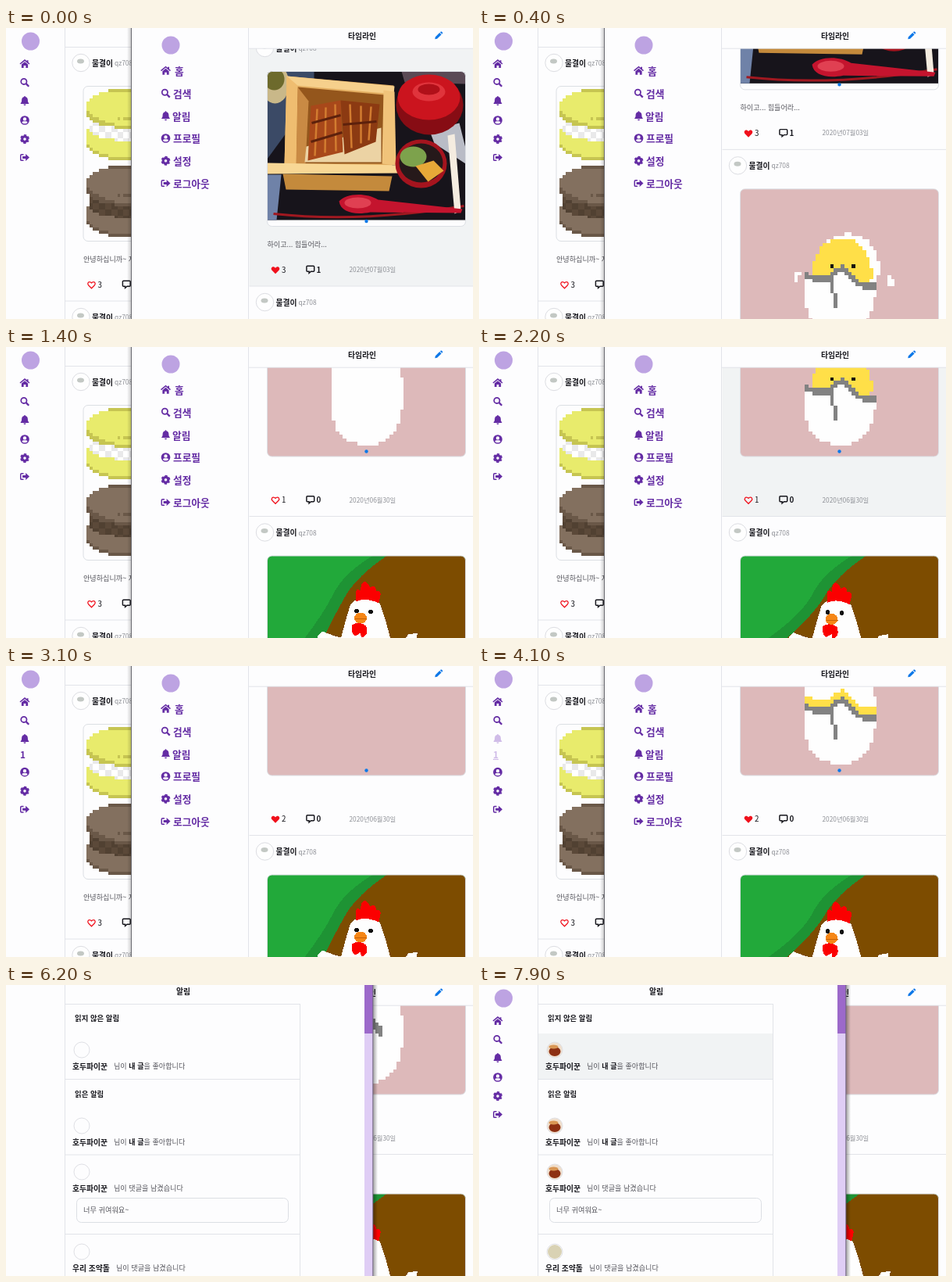
Write an HTML page that moves like this. It is 598 by 372 pixels and loops after 8 s.

```html
<!DOCTYPE html>
<html lang="ko">
<head>
<meta charset="utf-8">
<title>타임라인</title>
<style>
html, body { margin: 0; width: 100%; height: 100%; overflow: hidden; background: #fdfdfe; }
svg { display: block; width: 598px; height: 372px; }
text { font-family: "Noto Sans CJK KR", "Noto Sans CJK JP", "Noto Sans", sans-serif; white-space: pre; }
</style>
</head>
<body>
<svg id="stage" viewBox="0 0 598 372" xmlns="http://www.w3.org/2000/svg"></svg>
<script>
const NS = 'http://www.w3.org/2000/svg';
const LOOP = 8000;
const BG = '#fdfdfe', HOVER = '#f1f3f4', LINE = '#e2e4e9', INK = '#16161c', SOFT = '#55555c';
const GREY = '#8e9096', PURPLE = '#642ca4', PALE = '#d0bce8', BLUE = '#0d78e8', RED = '#f0101c';
const NAME = '물결이', HANDLE = 'qz708', FAN = '호두파이꾼', FAN2 = '우리 조약돌';

const stage = document.getElementById('stage');

function add(parent, tag, attrs = {}) {
  const node = document.createElementNS(NS, tag);
  for (const key in attrs) node.setAttribute(key, attrs[key]);
  parent.appendChild(node);
  return node;
}
const group = (parent, attrs) => add(parent, 'g', attrs);
const rect = (p, x, y, width, height, fill, more) => add(p, 'rect', { x, y, width, height, fill, ...more });
const path = (p, d, fill, more) => add(p, 'path', { d, fill, ...more });
const circle = (p, cx, cy, r, fill, more) => add(p, 'circle', { cx, cy, r, fill, ...more });
const oval = (p, cx, cy, rx, ry, fill) => add(p, 'ellipse', { cx, cy, rx, ry, fill });
const line = (p, d, stroke = LINE, width = 1) => path(p, d, 'none', { stroke, 'stroke-width': width });
const show = (node, on) => node.setAttribute('display', on ? 'inline' : 'none');
const shift = (node, x, y) => node.setAttribute('transform', `translate(${x} ${y})`);

// y is the optical middle of the line
function label(p, x, y, str, size, fill = INK, weight = 400, anchor = 'start') {
  const node = add(p, 'text', { x, y: y + size * 0.37, fill, 'font-size': size, 'font-weight': weight, 'text-anchor': anchor });
  node.textContent = str;
  return node;
}

// Pixel art: pick(col, row) gives a colour or nothing
function pixels(p, cols, rows, size, pick) {
  const runs = {};
  for (let r = 0; r < rows; r++) for (let c = 0; c < cols; c++) {
    const color = pick(c, r);
    if (color) runs[color] = (runs[color] || '') + `M${(c * size).toFixed(2)} ${(r * size).toFixed(2)}h${size}v${size}h${-size}z`;
  }
  const g = group(p, { 'shape-rendering': 'crispEdges' });
  for (const color in runs) path(g, runs[color], color);
  return g;
}

// ---- icons, drawn around 0,0 in a 16 unit box
const ICONS = {
  home: '<path d="M-8 0L0-6.600 8 0" fill="none" stroke="currentColor" stroke-width="2.1"/><path d="M3.500-6.500h2.500v4h-2.500zM-5.500.8L0-3.800 5.500.8V6.800H1.800V2.800H-1.800V6.800H-5.500z"/>',
  search: '<circle cx="-1.500" cy="-1.500" r="4.800" fill="none" stroke="currentColor" stroke-width="2.400"/><path d="M2.200 2.200L7 7" stroke="currentColor" stroke-width="3"/>',
  bell: '<path d="M0-8a1 1 0 0 1 1 1.300C4-6 5.200-3.700 5.200-1 5.200 2 6 3 7 4V5.200H-7V4C-6 3-5.200 2-5.200-1-5.200-3.700-4-6-1-6.700A1 1 0 0 1 0-8zM-2 6H2a2 2 0 0 1-4 0z"/>',
  user: '<path fill-rule="evenodd" d="M0-7.800a7.800 7.800 0 1 1 0 15.600a7.800 7.800 0 1 1 0-15.600zM0-5a2.900 2.900 0 1 0 0 5.800a2.900 2.900 0 1 0 0-5.800zM-4.700 3.800C-3 6.500 3 6.500 4.700 3.800C4 2 2.600 1.600 0 1.800C-2.600 1.600-4 2-4.700 3.800z"/>',
  cog: '<circle r="4.400" fill="none" stroke="currentColor" stroke-width="4.200"/><circle r="6.800" fill="none" stroke="currentColor" stroke-width="2.200" stroke-dasharray="4.200 2.920" stroke-dashoffset="2.100" transform="rotate(30)"/>',
  exit: '<path d="M-2-5H-5.500Q-7-5-7-3.500V3.500Q-7 5-5.500 5H-2" fill="none" stroke="currentColor" stroke-width="2"/><path d="M-3.800-2H1.500V-6L8 0 1.500 6V2H-3.800z"/>',
  pencil: '<path d="M-7 7L-6.200 2.800 1.800-5.200 5.200-1.800-2.800 6.200zM2.800-6.200L4-7.300Q5-8 6-7L7-6Q8-5 7.300-4L6.200-2.800z"/>',
  heart: '<path d="M0 6.500L-6 .4C-9-3-5.600-7.600-1.600-5.200L0-3.800 1.600-5.200C5.600-7.600 9-3 6 .4z"/>',
  comment: '<path d="M-5.500-6H5.500Q7-6 7-4.500V2.500Q7 4 5.500 4H1L-2.500 7V4H-5.500Q-7 4-7 2.500V-4.500Q-7-6-5.500-6z" fill="none" stroke="currentColor" stroke-width="2.100"/>'
};
function icon(p, name, x, y, color, size = 0.75) {
  const g = group(p, { transform: `translate(${x} ${y})`, color, fill: 'currentColor' });
  group(g, { transform: `scale(${size})` }).innerHTML = ICONS[name];
  return g;
}
function heart(p, x, y, full) {
  const g = icon(p, 'heart', x, y, RED, full ? 0.74 : 0.66);
  if (!full) {
    const shape = g.firstChild.firstChild;
    shape.setAttribute('fill', 'none');
    shape.setAttribute('stroke', RED);
    shape.setAttribute('stroke-width', 1.9);
  }
  return g;
}

// ---- one post: 325 high, card 254 x 198 at 23,50
function post(p, x, y, { likes, full, talks, date, text, dots = 1, own, draw }) {
  const g = group(p, { transform: `translate(${x} ${y})` });
  const back = rect(g, 0, 0, 301, 325, HOVER);
  show(back, false);
  circle(g, 20, 20.5, 11.2, '#fefefe', { stroke: '#dcdde2' });
  oval(g, 19.5, 18.5, 4.5, 3, '#c3c8c4');
  label(g, 34, 21, NAME, 9.8, INK, 700);
  label(g, 63, 21, HANDLE, 8.4, GREY);
  const card = group(g, { transform: 'translate(23 50.500)', 'clip-path': 'url(#card)' });
  rect(card, 0, 0, 254, 198, BG);
  const parts = draw(card);
  rect(g, 23, 50.5, 254, 198, 'none', { rx: 6, stroke: '#dcdfe4' });
  for (let i = 0; i < dots; i++) circle(g, 150 + (i - (dots - 1) / 2) * 8.6, 242, 2.2, i ? '#c9cbd0' : BLUE);
  if (text) label(g, 23, 271.3, text, 9.1, SOFT);
  const hollow = heart(g, 33.5, 304.5, false), solid = heart(g, 33.5, 304.5, true);
  const count = label(g, 41.5, 304.3, likes, 9.8, INK, 500);
  icon(g, 'comment', 78.3, 303.5, INK, 0.7);
  label(g, 86, 304.3, talks, 9.8, INK, 700);
  label(g, 128, 304, date, 8.3, GREY);
  if (own) line(g, 'M244.500 303.700L249.200 308.400L253.900 303.700', INK, 2.8);
  line(g, 'M0 325H301');
  const like = (on, n) => { show(hollow, !on); show(solid, on); count.textContent = n; };
  like(!!full, likes);
  return { back, like, parts };
}

// ---- pictures
function macaron(p, x, y, [light, dark, creamA, creamB]) {
  const art = pixels(p, 30, 23, 3.95, (c, r) => {
    const u = Math.abs(c - 14.5) / 15;
    const top = 4.2 * u ** 4, seam = 12.3 - 3.7 * u ** 3, base = 22.4 - 4.5 * u ** 4;
    if (r + 0.3 < top || r >= base) return;
    if (r < seam) {
      const mark = r === 0 || (r === 9 && c > 9 && c < 18 && c !== 11);
      return r >= seam - 1 - 1.5 * u ** 3 || mark ? dark : light;
    }
    if (r < seam + 4) return u > 0.93 ? null : ((c >> 1) + (r >> 1)) % 2 ? creamA : creamB;
    return r >= base - 1 ? dark : light;
  });
  shift(art, x, y);
}
function macarons(p) {
  macaron(p, 4, 3.5, ['#e8eb6c', '#c6c552', '#ffffff', '#e9e9ea']);
  macaron(p, 131, 3.5, ['#9ae0cb', '#82c2b0', '#ffffff', '#e9e9ea']);
  macaron(p, 4, 101.8, ['#83705f', '#6a5848', '#5b4939', '#514132']);
  macaron(p, 131, 101.8, ['#ff8fb0', '#ec7395', '#e8668a', '#d95c80']);
}

function lunch(p) {
  rect(p, 0, 0, 254, 190, '#17141b');
  path(p, 'M0 0H60V30L0 112z', '#3b4a66');
  path(p, 'M0 132L18 132 12 190H0z', '#6f82a8');
  path(p, 'M172 0H254V16L176 14z', '#5a4a55');
  path(p, 'M208 76L246 66 254 98V118L214 92z', '#b9bcc6');
  path(p, 'M8 182Q120 194 252 172', 'none', { stroke: '#a01820', 'stroke-width': 3 });
  oval(p, 10, 16, 18, 25, '#c9b889');
  oval(p, 9, 10, 13, 14, '#6d6a2c');
  path(p, 'M25 6L162 18 160 122 22 122z', '#e2ad60');
  path(p, 'M39 20L150 30 148 118 37 118z', '#94561c');
  path(p, 'M39 20L53 38 49 118 37 118z', '#c98a44');
  path(p, 'M50 96L146 72V116H48z', '#ecd3a4');
  path(p, 'M56 44L94 37 97 103 52 114z', '#a8481a');
  path(p, 'M94 37L144 42 139 90 99 106z', '#8c3a12');
  line(p, 'M64 48L61 108M75 46L74 104M87 42L88 102M106 42L108 98M120 44L120 92M133 45L130 88', '#d27c30', 2.5);
  line(p, 'M57 66L94 56M56 90L96 78M97 68L140 64', '#5d210c', 3);
  path(p, 'M25 6L163 19 162 29 25 17z', '#f6d08c');
  path(p, 'M25 6L39 18 37 118 22 118z', '#efbd70');
  path(p, 'M149 24L163 26 165 120 147 118z', '#f0c37a');
  path(p, 'M20 131L160 134 156 153 24 151z', '#c48a3c');
  path(p, 'M0 117L178 120 179 130 0 131z', '#f8d795');
  oval(p, 208, 43, 43, 38, '#870c14');
  oval(p, 207, 33, 40, 29, '#cb141e');
  oval(p, 207, 26, 21, 12, '#e0343c');
  oval(p, 207, 23, 14, 7, '#b01019');
  oval(p, 197, 118, 33, 31, '#a5141e');
  oval(p, 197, 117, 28, 25, '#26191a');
  oval(p, 187, 109, 17, 13, '#7da24c');
  path(p, 'M190 121L213 114 226 127 206 141z', '#e8a838');
  path(p, 'M231 82L240 80 248 178 240 182z', '#f4ece0');
  path(p, 'M92 166C100 156 126 154 142 164L250 176 248 181 132 180C112 184 94 180 92 166z', '#c4142e');
  oval(p, 116, 168, 17, 7, '#e04052');
}

const RIM = [[81, 107], [96, 116], [112, 114], [131, 101], [144, 114], [152, 122], [174, 124]];
function rimAt(x) {
  const i = Math.max(1, RIM.findIndex(pt => pt[0] >= x));
  const [[ax, ay], [bx, by]] = [RIM[i - 1], RIM[i]];
  return ay + (by - ay) * (x - ax) / (bx - ax);
}
const inside = (x, y, cx, cy, rx, ry, n = 2) => Math.abs((x - cx) / rx) ** n + Math.abs((y - cy) / ry) ** n < 1;

function eggs(p) {
  rect(p, 0, 0, 254, 198, '#ddb9ba');
  const S = 4.6, HALF = S / 2, white = '#fefefe', grey = '#828282', yellow = '#ffdf48';
  const make = mode => pixels(p, 55, 43, S, (c, r) => {
    const x = (c + 0.5) * S, y = (r + 0.5) * S;
    const egg = inside(x, y, 127, 118, 46.5, 65, 2.5);
    if (mode === 'whole') return egg && white;
    const rim = x > 81 && x < 174 ? rimAt(x) : 110;
    const split = Math.abs(y - rim) < 4;
    const tail = y > 116 && y < 154 && Math.abs(x - (y < 135 ? 116 : 124)) <= HALF;
    if (mode === 'crack') return egg && (Math.abs(y - rim - 4) < 7 && x > 131 && x < 149 ? grey : white);
    if (egg && (split || tail)) return grey;
    if (egg && y > rim) return white;
    if (mode === 'open') return egg && (y > rim - 14 ? yellow : white);
    if (Math.abs(y - 99) <= HALF && Math.abs(Math.abs(x - 130) - 15) <= HALF) return '#15130f';
    if (y < rim && inside(x, y, 130, 108, 38.5, 45)) return yellow;
    if (mode !== 'pop') return;
    if (y < rim && inside(x, y, 138, 100, 40, 43)) return white;
    const shard = (x > 68 && x < 78 && y > 106 && y < 112) || (x > 68 && x < 73 && y < 118 && y > 106) ||
      (x > 187 && x < 198 && y > 113 && y < 122) || (x > 188 && x < 193 && y > 109 && y < 114);
    return shard && white;
  });
  const out = {};
  for (const mode of ['whole', 'crack', 'open', 'chick', 'pop']) out[mode] = make(mode);
  return out;
}

function hen(p) {
  const hill = [[161, 60], [153, 72]].map(([a, b]) => {
    const g = group(p, { 'shape-rendering': 'crispEdges' });
    rect(g, 0, 0, 254, 198, '#22a93a');
    path(g, `M${a - 18} 0Q${a - 55} 22 ${a - 68} 48T${b - 24} 105L0 198H254V0z`, '#1e9334');
    path(g, `M${a} 0Q${a - 38} 26 ${a - 52} 50T${b} 105L10 198H254V0z`, '#7d4c00');
    return g;
  });
  const bird = group(p, { 'shape-rendering': 'crispEdges' });
  path(bird, 'M104 64C112 52 134 52 142 63L149 84 155 106 170 114 178 102 190 100 188 112 180 150 166 190H84L68 140 62 104 68 98 84 104 92 106 98 84z', '#fefefe');
  path(bird, 'M111 60V48Q112 42 117 46Q118 32 124 35Q128 38 129 42Q136 37 137 46Q145 46 142 54L140 62Q124 54 111 60z', '#fb0000');
  path(bird, 'M106 90Q114 84 124 91Q128 104 118 106L117 100 110 104Q104 100 106 90z', '#fb0000');
  oval(bird, 117, 81, 8, 7, '#f58616');
  line(bird, 'M110 82H125', '#c76208', 1);
  circle(bird, 112, 72, 3, '#111');
  circle(bird, 130, 73, 3, '#111');
  return { hill, bird };
}

// ---- shared definitions
stage.innerHTML = `<defs>
  <clipPath id="card"><rect width="254" height="198" rx="6"/></clipPath>
  <linearGradient id="toLeft"><stop offset="0" stop-opacity="0"/><stop offset="1" stop-opacity=".22"/></linearGradient>
  <linearGradient id="toRight"><stop offset="0" stop-opacity=".36"/><stop offset="1" stop-opacity="0"/></linearGradient>
</defs>`;
const KINDS = ['home', 'search', 'bell', 'user', 'cog', 'exit'];

// ---- left window
const left = group(stage);
rect(left, 470, 0, 6, 372, 'url(#toRight)');
rect(left, 0, 0, 470, 372, BG);

const nav = group(left);
circle(nav, 31.5, 17, 11.5, '#bda3e2');
const NAV_Y = [46, 69.5, 93, 118, 142, 165.5];
const navIcons = KINDS.map((kind, i) => icon(nav, kind, 24, NAV_Y[i], PURPLE));
const badge = label(nav, 18, 113.5, '1', 11.8, PURPLE, 700);

const home = group(left);
const feedPost = { likes: 3, talks: 0, date: '4일전', text: '안녕하십니까~ 저는 어쩌구 저쩌구', dots: 2, own: true, draw: macarons };
post(home, 76, 24, feedPost);
post(home, 76, 349, feedPost);
rect(home, 76, 0, 301, 24.5, BG);
label(home, 220, 8, '타임라인', 9.8, INK, 700, 'middle');
icon(home, 'pencil', 319, 7.6, BLUE, 0.68);

const alerts = group(left);
label(alerts, 227, 8, '알림', 9.8, INK, 700, 'middle');
label(alerts, 88, 42.5, '읽지 않은 알림', 9.4, INK, 700);
label(alerts, 88, 139.5, '읽은 알림', 9.4, INK, 700);
const hotRow = rect(alerts, 76, 62, 301, 58.5, HOVER);
const faces = group(alerts);
function alertRow(y, name, tx, parts, pale) {
  circle(alerts, 97, y, 10, 'none', { stroke: '#dfe0e5' });
  if (pale) circle(faces, 97, y, 9, '#d9d2b4');
  else {
    circle(faces, 97, y, 9.8, '#f0dfcd');
    oval(faces, 97, y + 2, 7.5, 6, '#8d3013');
    oval(faces, 95.5, y - 4, 6, 2.5, '#d99755');
  }
  label(alerts, 85, y + 21, name, 9.8, INK, 700);
  const msg = label(alerts, tx, y + 20.7, '', 9.1, SOFT);
  parts.forEach((part, i) => {
    const span = add(msg, 'tspan', i === 1 ? { 'font-weight': 700, fill: INK } : {});
    span.textContent = part;
  });
}
const liked = ['님이 ', '내 글', '을 좋아합니다'], wrote = ['님이 댓글을 남겼습니다'];
alertRow(83, FAN, 138, liked);
alertRow(180, FAN, 138, liked);
alertRow(239, FAN, 138, wrote);
alertRow(341, FAN2, 141, wrote, true);
rect(alerts, 90.5, 272.5, 271, 31, BG, { rx: 6, stroke: '#dcdfe4' });
label(alerts, 99, 288, '너무 귀여워요~', 9.2, SOFT);
line(alerts, 'M76 120.500H377M76 217H377M76 318.500H377');

line(left, 'M75.500 0V372M76 24.500H377M376.500 24.500V372', LINE);
rect(left, 459, 0, 11, 372, '#dfcdf5');
const thumb = rect(left, 459, 0, 11, 27, '#9c69ca');
line(left, 'M469.800 0V372', '#6f6480');

// ---- right window
const right = group(stage);
rect(right, 155, 0, 6, 372, 'url(#toLeft)');
rect(right, 161, 0, 437, 372, BG);
line(right, 'M160.500 0V372', '#6a6a70');
const feed = group(right);
const COL = 311.5;
const eel = post(feed, COL, 5, { likes: 3, full: true, talks: 1, date: '2020년07월03일', text: '하이고... 힘들어라...', draw: lunch });
const egg = post(feed, COL, 330, { likes: 1, talks: 0, date: '2020년06월30일', draw: eggs });
const chicken = post(feed, COL, 655, { likes: 1, talks: 0, date: '2020년06월30일', draw: hen });
rect(right, 311, 0, 287, 26, BG);
line(right, 'M311 26.200H598M310.500 0V372', LINE);
label(right, 456, 10, '타임라인', 9.8, INK, 700, 'middle');
icon(right, 'pencil', 554, 9.6, BLUE, 0.68);
circle(right, 211, 22, 11.5, '#bda3e2');
const MENU = [['홈', 216], ['검색', 214], ['알림', 213], ['프로필', 214], ['설정', 214], ['로그아웃', 214]];
MENU.forEach(([word, x], i) => {
  const y = 54.6 + i * 28.8;
  icon(right, KINDS[i], 204.5, y, PURPLE);
  label(right, x, y + 0.7, word, 12.7, PURPLE, 700);
});

// ---- timing
const SCROLL = [[0, 0], [900, 393], [1000, 421], [1200, 438.5], [LOOP, 438.5]];
const EGG = [[0, 'pop'], [1400, 'whole'], [1700, 'crack'], [2000, 'chick'], [2500, 'pop'], [3000, 'none'], [3200, 'whole'],
  [3600, 'crack'], [3900, 'open'], [4300, 'pop'], [4500, 'none'], [4700, 'whole'], [5800, 'crack'], [6600, 'open'], [7000, 'chick'],
  [7300, 'pop'], [7700, 'none']];
const during = (t, a, b) => t >= a && t < b;
function along(keys, t) {
  const i = keys.findIndex(key => key[0] > t);
  const [[ta, a], [tb, b]] = [keys[i - 1], keys[i]];
  return a + (b - a) * (t - ta) / (tb - ta);
}

let front = null;
function raise(win) {
  if (win !== front) stage.appendChild(front = win);
}

function draw(t) {
  raise(t < 4700 ? right : left);

  shift(feed, 0, -along(SCROLL, t));
  show(eel.back, t < 100);
  show(egg.back, during(t, 1900, 2900));
  egg.like(t >= 2500, t >= 2500 ? 2 : 1);

  const mode = EGG.filter(step => step[0] <= t).pop()[1];
  for (const key in egg.parts) show(egg.parts[key], key === mode);
  const pose = Math.floor(t / 300 + 2 / 3) % 2;
  const { hill, bird } = chicken.parts;
  hill.forEach((node, i) => show(node, i === pose));
  shift(bird, pose ? 2.5 : 0, pose ? -1.5 : 0);

  const count = during(t, 2600, 6700);
  const onBell = during(t, 3700, 7400), onUser = during(t, 3400, 3700);
  navIcons.forEach((node, i) => {
    shift(node, 24, NAV_Y[i] + (count && i > 2 ? 17.7 : 0));
    node.setAttribute('color', (i === 2 && onBell) || (i === 3 && onUser) ? PALE : PURPLE);
  });
  show(badge, count);
  badge.setAttribute('fill', onBell ? PALE : PURPLE);
  badge.setAttribute('text-decoration', onBell ? 'underline' : 'none');

  const inbox = t >= 5800;
  show(home, !inbox);
  show(alerts, inbox);
  show(nav, !during(t, 5800, 6300));
  show(faces, t >= 6500);
  show(hotRow, t >= 7500);
  thumb.setAttribute('height', inbox ? 62 : 27);
}

function tick() {
  draw(Math.floor(performance.now() % LOOP / 100) * 100);
  requestAnimationFrame(tick);
}
tick();
</script>
</body>
</html>
```
